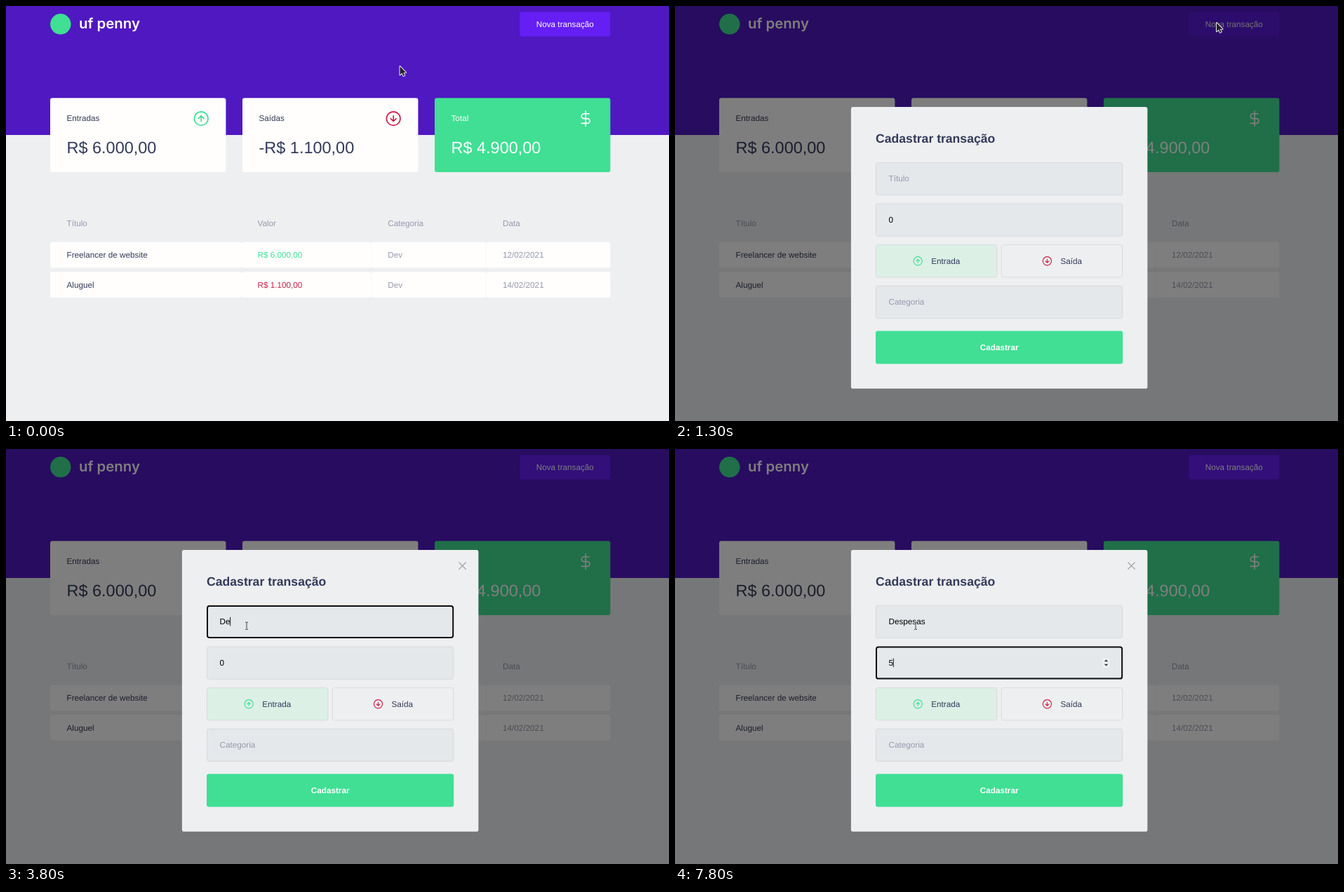
Animation, 945 px wide and 592 px high, one loop 8000 ms. Source, as an HTML page with a canvas:

```html
<!DOCTYPE html>
<html lang="pt-BR">
<head>
<meta charset="utf-8">
<title>Transações</title>
<style>
html, body { margin: 0; width: 100%; height: 100%; overflow: hidden; background: #eeeff1; }
canvas { display: block; }
</style>
</head>
<body>
<canvas id="stage" width="945" height="592"></canvas>
<script>
const ctx = document.getElementById('stage').getContext('2d');
const LOOP = 8000, STEP = 100, EM = 11.735;
const SANS = '"Liberation Sans", Arial, sans-serif';
const C = {
  header: '#5018c1', button: '#651ef4', page: '#eeeff1', card: '#fffefd',
  green: '#40df94', red: '#c81e46', title: '#333b59', body: '#9799ad',
  field: '#e4e8ea', line: '#d3d6d8', ink: '#0b0c0e'
};
const ARROW_UP = new Path2D('M2 12a10 10 0 1 0 20 0a10 10 0 1 0-20 0M16 12L12 8L8 12M12 16V8');
const ARROW_DOWN = new Path2D('M2 12a10 10 0 1 0 20 0a10 10 0 1 0-20 0M8 12L12 16L16 12M12 8V16');
const DOLLAR = new Path2D('M12 1V23M17 5H9.5a3.5 3.5 0 0 0 0 7h5a3.5 3.5 0 0 1 0 7H6');
const CROSS = new Path2D('M4 4L20 20M20 4L4 20');
const POINTER = new Path2D('M0 0V12.2L2.9 9.6L4.9 13.9L6.8 13L4.9 8.9H8.6Z');
const HAND = new Path2D('M-1 1Q0-.6 1 1V5L7 6.2Q8.4 6.6 8.2 8.2L7.4 11V13H1V11.4L-3 7.6Q-3.2 5.8-1.6 6.6L-1 7.2Z');
const BEAM = new Path2D('M-2-5Q0-5 0-4Q0-5 2-5M0-4V4.6M-2 5.5Q0 5.5 0 4.6Q0 5.5 2 5.5');

// [time, x, y] of the mouse
const PATH = [
  [400, 561.5, 86], [500, 602, 90], [600, 684, 74], [700, 684, 74], [800, 718, 56],
  [900, 752, 37], [1000, 770, 27], [1100, 772, 24], [1300, 772, 24], [1400, 752, 44],
  [1500, 700, 88], [1600, 628, 138], [1700, 545, 175], [1800, 450, 212],
  [1900, 385, 238], [2000, 350, 249], [2100, 343, 252]
];
// [time, typed title]
const TYPED = [
  [0, ''], [3700, 'D'], [3800, 'De'], [4300, 'Desp'], [4400, 'Despe'], [4600, 'Despes'],
  [4800, 'Despesa'], [4900, 'Despesas'], [5100, 'Despesas '], [6600, 'Despesas']
];

const within = (t, a, b) => t >= a && t < b;
const clamp = v => Math.max(0, Math.min(1, v));

function box(x, y, w, h, fill, stroke, line = 0.8, r = 2.9) {
  const i = stroke ? line / 2 : 0;
  ctx.beginPath();
  ctx.roundRect(x + i, y + i, w - 2 * i, h - 2 * i, r);
  if (fill) { ctx.fillStyle = fill; ctx.fill(); }
  if (stroke) { ctx.strokeStyle = stroke; ctx.lineWidth = line; ctx.stroke(); }
}

function text(s, x, y, color, size = EM, weight = 400, align = 'left', family = SANS) {
  ctx.font = `${weight} ${size}px ${family}`;
  ctx.textRendering = 'geometricPrecision';
  ctx.textAlign = align;
  ctx.fillStyle = color;
  ctx.fillText(s, x, y);
}

function icon(path, x, y, scale, color, line) {
  ctx.save();
  ctx.translate(x, y);
  ctx.scale(scale, scale);
  ctx.translate(-12, -12);
  ctx.strokeStyle = color;
  ctx.lineWidth = line / scale;
  ctx.lineCap = ctx.lineJoin = 'round';
  ctx.stroke(path);
  ctx.restore();
}

function card(x, label, value, path, tint, bg = C.card, color = C.title) {
  box(x, 131.3, 250.4, 105.6, bg);
  text(label, x + 23.5, 164.3, color);
  text(value, x + 23.5, 210, color, 2 * EM);
  icon(path, x + 215.2, 160.6, 0.978, tint, 1.65);
}

function row(y, cells, colors) {
  const edges = [63, 335, 520.7, 684.5, 861.3];
  cells.forEach((s, i) => {
    box(edges[i], y, edges[i + 1] - edges[i], 36.6, C.card);
    text(s, edges[i] + 23.5, y + 22.3, colors[i]);
  });
}

function page(hover) {
  ctx.fillStyle = C.page;
  ctx.fillRect(0, 0, 945, 592);
  ctx.fillStyle = C.header;
  ctx.fillRect(0, 0, 945, 184);

  ctx.fillStyle = C.green;
  ctx.beginPath();
  ctx.arc(77.8, 25.8, 14.7, 0, 7);
  ctx.fill();
  text('uf penny', 104, 32.3, '#fffefd', 20.4, 600, 'left', 'Inter, sans-serif');

  box(732.3, 8.4, 129, 35, C.button);
  text('Nova transação', 796.8, 29.6, '#fffefd', EM, 400, 'center');
  if (hover) box(732.3, 8.4, 129, 35, `rgba(0,0,0,${0.11 * hover})`);

  card(63, 'Entradas', 'R$ 6.000,00', ARROW_UP, C.green);
  card(337, 'Saídas', '-R$ 1.100,00', ARROW_DOWN, C.red);
  card(611, 'Total', 'R$ 4.900,00', DOLLAR, C.card, C.green, C.card);

  [['Título', 86.5], ['Valor', 358.5], ['Categoria', 544.2], ['Data', 708]]
    .forEach(([s, x]) => text(s, x, 314.2, C.body));
  row(336.8, ['Freelancer de website', 'R$ 6.000,00', 'Dev', '12/02/2021'], [C.title, C.green, C.body, C.body]);
  row(379.2, ['Aluguel', 'R$ 1.100,00', 'Dev', '14/02/2021'], [C.title, C.red, C.body, C.body]);
}

function field(y, s, color, focused) {
  box(286, y, 352.2, 47, C.field, focused ? C.ink : C.line, focused ? 2 : 0.8);
  text(s, 304.5, y + 27.1, color);
}

function caret(s, y) {
  ctx.font = `${EM}px ${SANS}`;
  ctx.fillStyle = '#000';
  ctx.fillRect(304.3 + ctx.measureText(s).width, y, 0.9, 12.6);
}

function choice(x, label, path, tint, bg, iconX) {
  box(x, 340.3, 173.2, 47, bg, C.line);
  icon(path, iconX, 363.8, 0.611, tint, 1.15);
  text(label, iconX + 19, 367.9, C.title);
}

function squiggle() {
  ctx.fillStyle = '#e03038';
  for (let x = 304.6, i = 0; x < 356.6; x += 1.47, i++) ctx.fillRect(x, i % 2 ? 251.4 : 252, 1, 1);
}

function spinner() {
  box(609.8, 298.6, 9.6, 12.8, '#f1f2f3', null, 0, 1);
  ctx.fillStyle = '#3f4245';
  for (const d of [-1, 1]) {
    ctx.beginPath();
    ctx.moveTo(611.7, 305 + 1.7 * d);
    ctx.lineTo(617.5, 305 + 1.7 * d);
    ctx.lineTo(614.6, 305 + 4.7 * d);
    ctx.fill();
  }
}

function modal(t) {
  ctx.fillStyle = 'rgba(0,0,0,.5)';
  ctx.fillRect(0, 0, 945, 592);
  box(250.9, 143.9, 422.5, 401.9, C.page);
  if (t >= 1400) icon(CROSS, 650.6, 166.6, 0.6, '#9b9ca3', 1.2);
  text('Cadastrar transação', 286.1, 195.2, C.title, 1.5 * EM, 700);

  const typed = TYPED.filter(k => k[0] <= t).pop()[1];
  const onTitle = within(t, 2200, 6800), onValue = t >= 6800;
  field(223, typed || 'Título', typed ? '#000' : C.body, onTitle);
  if (within(t, 5500, 6800)) squiggle();
  if (onTitle && !within(t, 2700, 3300) && !within(t, 5700, 6300)) caret(typed, 239.8);

  const value = t >= 7800 ? '5' : '0';
  field(281.6, value, '#000', onValue);
  if (within(t, 6800, 7800)) {
    ctx.fillStyle = '#3584e4';
    ctx.fillRect(304.5, 297.8, 6.5, 13.6);
    text(value, 304.5, 308.7, '#fff');
  }
  if (onValue) spinner();
  if (t >= 7800) caret(value, 298.6);

  choice(286, 'Entrada', ARROW_UP, C.green, '#dcf0e6', 346.2);
  choice(465, 'Saída', ARROW_DOWN, C.red, null, 530.5);
  field(399, 'Categoria', C.body, false);
  box(286, 463.5, 352.2, 47, C.green);
  text('Cadastrar', 462.1, 491.1, '#fffefd', EM, 700, 'center');
}

function mouseAt(t) {
  const next = PATH.findIndex(k => k[0] > t);
  if (next === 0) return PATH[0].slice(1);
  if (next < 0) return PATH[PATH.length - 1].slice(1);
  const [a, b] = [PATH[next - 1], PATH[next]];
  const p = (t - a[0]) / (b[0] - a[0]);
  return [a[1] + (b[1] - a[1]) * p, a[2] + (b[2] - a[2]) * p];
}

function mouse(t) {
  const [x, y] = mouseAt(t);
  const beam = t > 1600 && y > 223;
  const hand = within(t, 900, 1300);
  ctx.save();
  ctx.translate(x, y);
  ctx.lineJoin = 'round';
  if (beam) {
    ctx.strokeStyle = 'rgba(255,255,255,.75)';
    ctx.lineWidth = 2;
    ctx.stroke(BEAM);
    ctx.strokeStyle = '#303236';
    ctx.lineWidth = 1;
    ctx.stroke(BEAM);
  } else {
    const shape = hand ? HAND : POINTER;
    ctx.strokeStyle = hand ? '#17131f' : '#f2f2f2';
    ctx.lineWidth = hand ? 1.6 : 1.9;
    ctx.stroke(shape);
    ctx.fillStyle = hand ? '#fff' : '#24212b';
    ctx.fill(shape);
  }
  ctx.restore();
}

function draw(now) {
  const t = Math.floor((now % LOOP) / STEP) * STEP;
  page(Math.min(clamp((t - 850) / 200), clamp((1600 - t) / 200)));
  if (t >= 1300) modal(t);
  mouse(t);
}

let start;
function tick(now) {
  start ??= now;
  draw(now - start);
  requestAnimationFrame(tick);
}
draw(0);
requestAnimationFrame(tick);
</script>
</body>
</html>
```
